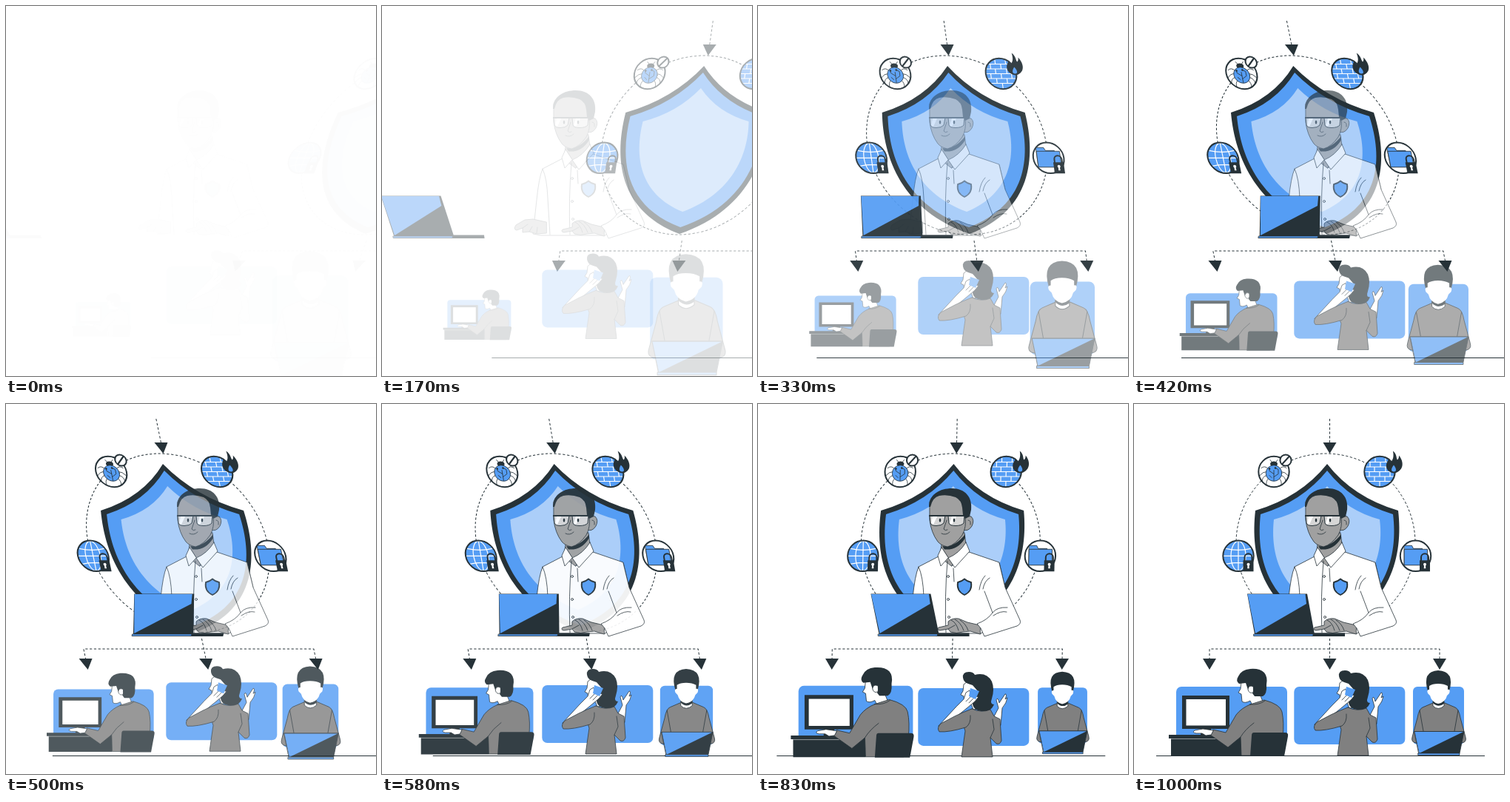
An HTML page for the animation above (1.04 s loop, 500 by 500 pixels).

```html
<!DOCTYPE html>
<html lang="en">
<head>
<meta charset="utf-8">
<title>Protected team</title>
<style>
  html, body { margin: 0; width: 100%; height: 100%; overflow: hidden; background: #fff; }
  svg { display: block; width: 100vw; height: 100vh; }
  .d { fill: #263238; }
  .b { fill: #559df4; }
  .l { fill: #abcef9; }
  .w { fill: #fff; }
  .g { fill: #808080; }
  .s { fill: #a0a0a0; }
  .o { stroke: #263238; stroke-width: .8; stroke-linejoin: round; stroke-linecap: round; }
  .n { fill: none; }
  .ring { stroke: #263238; stroke-width: 2; }
  .dash { fill: none; stroke: #263238; stroke-width: 1; stroke-dasharray: 3.2 2.6; }
  .white { fill: none; stroke: #fff; stroke-width: 1.2; }
</style>
</head>
<body>
<svg viewBox="0 0 500 500">
  <defs>
    <path id="tip" class="d" d="M-9 0H9L0 15Z"/>
    <g id="lock">
      <path class="n" stroke="#263238" stroke-width="2" d="M-5 1V-4A5 5 0 0 1 5 -4V1"/>
      <path class="d" d="M-7 0H7V15H-7Z"/>
      <circle class="w" cy="5.5" r="2"/>
      <path class="w" d="M-.9 6H.9L1.3 11H-1.3Z"/>
    </g>
    <clipPath id="disc"><circle r="20"/></clipPath>
  </defs>

  <g id="shield">
    <path stroke="#263238" d="M30 475.5H474"/>
    <circle class="dash" cx="259" cy="188" r="121"/>
    <path class="dash" d="M264.5 20V54M264.5 317V346M102 346V331H413V346"/>
    <use href="#tip" x="264.5" y="52"/>
    <use href="#tip" x="102" y="344"/>
    <use href="#tip" x="264.5" y="344"/>
    <use href="#tip" x="413" y="344"/>

    <path class="d" d="M261 81Q225 126 164 144C157 205 172 276 260 308C348 276 364 205 357 144Q296 126 261 81Z"/>
    <path class="b" d="M261 90Q227 132 171 149C165 206 179 270 260 299C341 270 357 206 350 149Q294 132 261 90Z"/>
    <path class="l" d="M261 111Q234 144 189 156C184 203 198 254 260 278C322 254 338 203 332 156Q288 144 261 111Z"/>

    <g transform="translate(189 91.5)">
      <circle class="w ring" r="20.7"/>
      <path class="n o" stroke-width="1" d="M-8-4Q-12-9-17-5M-10 0Q-15 0-19 5M-10 5Q-16 7-16 13M-7 9Q-11 12-10 18M8-4Q12-9 17-5M10 0Q15 0 19 5M10 5Q16 7 16 13M7 9Q11 12 10 18M-2-12L-5-16M2-12L5-16"/>
      <ellipse class="d" cy="-10.500" rx="5" ry="3.5"/>
      <circle class="b o" cy="2" r="10.8"/>
      <path class="n o" d="M0 12V3L-6-1V-5M0 7L6 3V-3L2-5M-6 5L-3 8M0 3V-2"/>
      <circle cx="-6" cy="-4" r="1.3" class="d"/><circle cx="2" cy="-5" r="1.3" class="d"/>
      <circle class="w ring" cx="16" cy="-15.5" r="7.6"/>
      <path class="ring" d="M11-10L21-21"/>
    </g>

    <g transform="translate(332 91.5)">
      <circle class="b" r="20.7"/>
      <path class="white" clip-path="url(#disc)" d="M-21-13H21M-21-6.5H21M-21 0H21M-21 6.5H21M-21 13H21M-6-20V-13M8-20V-13M-13-13V-6.5M1-13V-6.5M14-13V-6.5M-7-6.5V0M8-6.5V0M-14 0V6.5M0 0V6.5M14 0V6.5M-7 6.5V13M7 6.5V13M0 13V20"/>
      <circle class="n ring" r="20.7"/>
      <path class="d" d="M18-28C24-23 22-18 24-16C26-18 26-20 26-22C31-16 32-9 29-4C26 0 22 2 19 2C12 1 8-4 9-10C10-14 12-16 13-18C14-16 14-14 15-13C19-17 19-22 18-28Z"/>
      <path class="b" d="M19-9C23-4 23 0 19 0C15 0 15-4 19-9Z"/>
    </g>

    <g transform="translate(141 205.3)">
      <circle class="b" r="20.7"/>
      <path class="white" d="M0-20V20M-20 0H20M-17-10Q0-6 17-10M-17 11Q0 7 17 11"/>
      <ellipse class="white" rx="10" ry="20"/>
      <circle class="n ring" r="20.7"/>
      <use href="#lock" x="13.5" y="6"/>
    </g>

    <g transform="translate(380.5 205.3)">
      <circle class="w ring" r="20.7"/>
      <path class="b o" d="M-15-14H-5L-3-10H9V12H-15Z"/>
      <path class="b o" d="M-15-9H16V12.500H-15Z"/>
      <use href="#lock" x="12.5" y="6"/>
    </g>
  </g>

  <g id="man">
    <path class="s o" d="M248 190L245 213L258 222L282 198L279 174Z"/>
    <path class="d" d="M249 192Q266 194 280 176V181Q270 198 252 196.500Z"/>
    <path class="w o" d="M244 206L217 220Q212 232 209 262L204 308L215 310H302L319 284L334 248L326 214L285 200L262 219Z"/>
    <path class="w o" d="M248 194L243 205L247 219L257 208Z"/>
    <path class="w o" d="M281 187L286 199L266 221L257 208Q272 202 281 187Z"/>
    <path class="n o" d="M217 220Q223 233 224 260L227 309M256 212Q252 260 254 309M264 222L265 240"/>
    <g class="w o"><circle cx="257" cy="233" r="1.5"/><circle cx="257" cy="264" r="1.5"/><circle cx="258" cy="288" r="1.5"/></g>
    <path class="s o" d="M300 299L283 295L271 290Q262 289 257 294L257 299L244 302Q241 305 246 306L257 304L260 308Q268 311 277 308L287 307L300 311Z"/>
    <path class="n o" d="M257 304L266 299M261 292Q268 295 271 306M266 291Q274 295 278 306M273 292Q281 297 284 306"/>
    <path class="w o" d="M306 253L317 282Q310 292 296 297L301 303L306 314L350 300Q356 297 354 292L334 248L326 215"/>
    <path class="n o" d="M299 251Q301 238 307 232M304 250Q306 239 313 235M317 282Q323 274 337 275M318 286Q328 279 336 281"/>
    <path class="s o" d="M222 292L204 288L193 289L181 296Q177 302 182 303L190 300L190 306L199 305L209 308L222 307Z"/>
    <path class="n o" d="M190 300L197 295M199 305L203 298M209 307L210 299"/>

    <path class="s o" d="M278 157Q281 150 288 152Q293 157 289 165Q284 173 277 170Z"/>
    <path class="s o" d="M232 132C236 119 251 115 262 116C275 117 282 129 280 150Q282 167 276 177Q267 190 256 193Q247 191 243 186Q234 174 232 157Z"/>
    <path class="d" d="M231 139C231 122 246 114 262 114C280 114 290 126 288 143L286 152L280 155L277 150L276 140Q275 130 267 126Q256 122 245 124Q236 126 233 139Z"/>
    <path fill="#d6d6d6" stroke="#263238" stroke-width="1" d="M232 151H253L251 161Q248 164.500 241 164.500Q234 164.500 233 161ZM257 151H279L278 161Q275 164.500 267 164.500Q259 164.500 258 161Z"/>
    <path class="w" d="M236 152H242L237 163L234 161ZM262 152H268L262 163L259 161Z"/>
    <path stroke="#263238" stroke-width="2" d="M231 151H280"/>
    <g class="d"><ellipse cx="246" cy="157" rx="1.3" ry="2.5"/><ellipse cx="265" cy="157" rx="1.3" ry="2.5"/></g>
    <path class="n o" d="M255 157L251 169Q253 172 256 170M248 175Q254 178 259 173M284 157Q288 157 287 163"/>
    <path class="b" stroke="#263238" stroke-width="1.8" d="M279 236.500Q275 240 270 241Q268 253 279 258Q290 253 288 241Q283 240 279 236.500Z"/>
  </g>

  <g id="laptop">
    <path class="d" d="M153 256.500H234L244 311H163ZM240 309.500H285V314H240Z"/>
    <path class="b" d="M153.500 257H231.500L233 270L164 310Z"/>
    <path class="b o" stroke-width=".6" d="M162 311H242V313.500H162Z"/>
  </g>

  <g id="desk">
    <rect class="b" x="57" y="382" width="150" height="78" rx="7"/>
    <path class="w o" d="M145 374L144 385L141 390L145 392L146 402Q150 405 157 401L160 407L174 402L165 380L152 370Z"/>
    <path class="d" d="M142 378Q137 374 141 368Q145 359 157 358Q170 357 176 363Q181 369 179 379Q180 392 174 395H163L160 391Q162 387 160 382Q156 380 154 386L151 377Z"/>
    <path class="w o" d="M161 382Q155 379 154 386Q156 392 160 390"/>
    <path class="d" d="M65 394H129V439H65ZM90 438H104V447H90Z"/>
    <path class="w" d="M70.500 399H124V434.500H70.500Z"/>
    <path class="d" d="M47 447H144V452H47ZM50 451H145V475.500H50Z"/>
    <path stroke="#fff" stroke-width=".5" d="M50 452.500H141"/>
    <path class="g o" d="M157 406L176 400Q198 406 200 416Q203 430 201 450L195 475H145L144 450L127 464L103 447L107 440L124 444L138 420Q145 411 157 406Z"/>
    <path class="n o" d="M144 450Q150 440 162 431M157 406Q169 407 177 401"/>
    <path class="w o" d="M107 441L93 439L82 441Q78 444 84 445L92 445L97 448L104 447Z"/>
    <path class="d" d="M162 444H204Q209 444 208 449L203 476H157L159 448Q159 444 162 444Z"/>
  </g>

  <g id="caller">
    <rect class="b" x="216.300" y="382" width="150" height="78" rx="7"/>
    <path class="w o" d="M286 371L278 377L277 386L274 391L278 393L279 401L287 401L291 411L300 410L298 380Z"/>
    <path class="d" d="M277 368Q276 360 285 360Q291 360 293 364Q309 360 316 373Q320 383 316 396Q313 404 319 404Q314 416 301 413Q289 411 290 400L297 386L290 378L284 376Q278 374 277 368Z"/>
    <path class="w o" d="M244 433L268 407L278 397L281 388L286 385L287 392L298 394L293 400L286 406L264 424Z"/>
    <path class="b" d="M287 382L299 386L294 397L285 393Z"/>
    <path class="n o" d="M281 400L287 394M285 402L291 396"/>
    <path class="w o" d="M317 424L325 409L322 398Q324 393 326 402L334 390Q337 390 334 397L337 395Q336 402 330 409L328 432Z"/>
    <path class="g o" d="M289 410Q302 416 314 411L319 420L327 424L329 453Q327 459 322 457L314 449L317 475H275L280 440L276 428Z"/>
    <path class="g o" d="M289 410Q276 415 266 420L247 430Q241 436 245 441Q258 442 281 435Q288 430 287 419"/>
    <path class="n o" d="M317 424L319 438L314 449"/>
  </g>

  <g id="worker">
    <rect class="b" x="377" y="382" width="69" height="78" rx="6"/>
    <path class="g o" d="M404 404L390 410Q385 412 383 424L376 450Q374 457 381 458H443Q450 457 448 450L441 424Q439 412 434 410L420 404Z"/>
    <path class="n o" d="M386 414L391 442M438 414L433 442"/>
    <path class="w o" d="M404 394V408Q411 415 419 408V394Z"/>
    <path class="d" d="M404 399Q411 409 419 400V405Q411 411 404 404Z"/>
    <path class="d" d="M397 388Q389 361 411 360Q434 361 426 388Z"/>
    <path class="w" d="M399 381Q403 378 411 378Q419 378 424 381V386Q428 385 426 391L423 394Q421 403 411 405Q402 403 400 394L397 391Q395 386 399 386Z"/>
    <path class="d o" d="M379 442.500H446L440 472H385Z"/>
    <path class="b" d="M379.500 443H445L385.500 472Z"/>
    <path class="b o" d="M384 472H440V474.500H384Z"/>
  </g>
</svg>
<script>
  const LOOP = 1040, STEP = 1000 / 24, LEAD = 35;
  const byId = id => document.getElementById(id);

  // cubic-bezier(.36, -.01, .5, 1.38)
  const bezier = (s, a, b) => 3 * a * s * (1 - s) ** 2 + 3 * b * s * s * (1 - s) + s ** 3;
  function ease(p) {
    if (p >= 1) return 1;
    let lo = 0, hi = 1;
    for (let i = 0; i < 24; i++) {
      const mid = (lo + hi) / 2;
      if (bezier(mid, .36, .5) < p) lo = mid; else hi = mid;
    }
    return bezier(lo, -.01, 1.38);
  }

  // Slide in from one side with a swinging skew
  function swoop(t) {
    if (t < 600) {
      const e = ease(t / 600);
      return { x: 250 * (1 - e), skew: -20 + 30 * e, alpha: e };
    }
    const skew = t < 800 ? 10 - 12 * ease((t - 600) / 200) : -2 + 2 * ease((t - 800) / 200);
    return { x: 0, skew, alpha: 1 };
  }

  function pose(id, alpha, transform = "") {
    const el = byId(id);
    el.setAttribute("opacity", Math.min(1, Math.max(0, alpha)));
    el.setAttribute("transform", transform);
  }
  const lean = (x, skew, cy) => `translate(${x} ${cy}) skewX(${skew}) translate(0 ${-cy})`;
  const zoom = (k, cx, cy) => `translate(${cx} ${cy}) scale(${k}) translate(${-cx} ${-cy})`;

  function draw(t) {
    const e = ease(t / 1000), { x, skew, alpha } = swoop(t);
    pose("shield", alpha, lean(x, skew, 248));
    pose("laptop", alpha, lean(-x, -skew, 285));
    pose("man", e);
    pose("desk", e, zoom(.5 + .5 * e, 130.5, 418));
    pose("caller", e, `translate(0 ${-30 * (1 - e)})`);
    pose("worker", e, zoom(1.5 - .5 * e, 412, 418));
  }

  // 24 pictures a second, the first one held for two steps
  function tick() {
    const now = performance.now() % LOOP;
    const n = Math.floor((Math.floor(now / 10) * 10 + 5) / STEP);
    draw((n < 2 ? 0 : n * STEP) + LEAD);
    requestAnimationFrame(tick);
  }
  tick();
</script>
</body>
</html>
```
